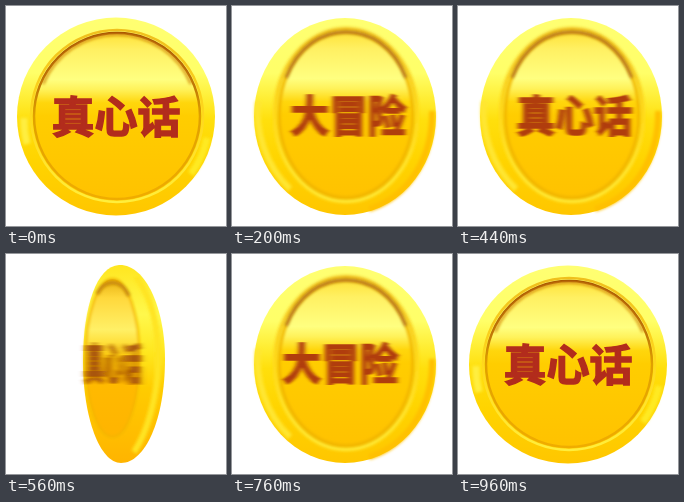
Recreate the animation shown at these times as an HTML page. Size 220 by 220 pixels, loop 3000 ms.

```html
<!DOCTYPE html>
<html lang="zh-CN">
<head>
<meta charset="utf-8">
<title>Coin flip</title>
<style>
  html, body { margin: 0; width: 100%; height: 100%; overflow: hidden; background: #fff; }
  svg { display: block; width: 100vw; height: 100vh; }
  text { font: 900 43px "Noto Sans CJK SC", "Noto Sans CJK", "Noto Sans", sans-serif; text-anchor: middle; stroke-width: 1.5; }
</style>
</head>
<body>
<svg viewBox="0 0 220 220">
  <defs>
    <linearGradient id="rim" x1="0" y1="0" x2="0" y2="1">
      <stop offset="0" stop-color="#ffff72"/>
      <stop offset=".28" stop-color="#ffff68"/>
      <stop offset=".42" stop-color="#ffec30"/>
      <stop offset=".52" stop-color="#ffdf0c"/>
      <stop offset=".72" stop-color="#ffd400"/>
      <stop offset="1" stop-color="#ffc600"/>
    </linearGradient>
    <linearGradient id="face" x1="0" y1="0" x2="0" y2="1">
      <stop offset="0" stop-color="#ffe238"/>
      <stop offset=".1" stop-color="#fff062"/>
      <stop offset=".28" stop-color="#ffff80"/>
      <stop offset=".34" stop-color="#fff25a"/>
      <stop offset=".42" stop-color="#ffd60c"/>
      <stop offset=".5" stop-color="#ffcd00"/>
      <stop offset="1" stop-color="#ffc200"/>
    </linearGradient>
    <linearGradient id="groove" x1="0" y1="0" x2="0" y2="1">
      <stop offset="0" stop-color="#9c4400"/>
      <stop offset=".25" stop-color="#b46808"/>
      <stop offset=".5" stop-color="#e0a000"/>
      <stop offset="1" stop-color="#f0ac00"/>
    </linearGradient>
    <linearGradient id="lip" x1="0" y1="0" x2="0" y2="1">
      <stop offset="0" stop-color="#f0c01c"/>
      <stop offset=".5" stop-color="#ffd81c"/>
      <stop offset="1" stop-color="#ffee3c"/>
    </linearGradient>
    <linearGradient id="side" x1="0" y1="0" x2="0" y2="1">
      <stop offset="0" stop-color="#ffe620"/>
      <stop offset=".25" stop-color="#fff84c"/>
      <stop offset=".45" stop-color="#ffe61c"/>
      <stop offset=".62" stop-color="#ffcc00"/>
      <stop offset="1" stop-color="#ffb400"/>
    </linearGradient>
    <linearGradient id="slim" x1="0" y1="0" x2="0" y2="1">
      <stop offset="0" stop-color="#e8b010"/>
      <stop offset=".12" stop-color="#ffd83c"/>
      <stop offset=".32" stop-color="#fff066"/>
      <stop offset=".5" stop-color="#ffcc08"/>
      <stop offset=".65" stop-color="#ffba00"/>
      <stop offset="1" stop-color="#ffb400"/>
    </linearGradient>
    <filter id="soft" x="-20%" y="-20%" width="140%" height="140%"><feGaussianBlur stdDeviation="1.6"/></filter>
    <filter id="smear" x="-20%" width="140%"><feGaussianBlur stdDeviation="2 0"/></filter>
    <filter id="streak" x="-40%" width="180%"><feGaussianBlur stdDeviation="3.4 0"/></filter>
  </defs>

  <g id="front">
    <circle cx="110" cy="110.5" r="99" fill="url(#rim)"/>
    <g fill="none" filter="url(#soft)">
      <path d="M18 112A94 94 0 0 0 21 138" stroke="#ffee40" stroke-width="7"/>
      <path d="M201 132A94 94 0 0 1 185 168" stroke="#ffea20" stroke-width="7"/>
    </g>
    <circle cx="111" cy="110" r="86" fill="none" stroke="url(#lip)" stroke-width="2.5"/>
    <circle cx="111" cy="110" r="83" fill="url(#face)" stroke="url(#groove)" stroke-width="2.5"/>
    <path d="M37 78A80 80 0 0 1 185 78" fill="none" stroke="#d69010" stroke-width="2.5" filter="url(#soft)"/>
  </g>

  <g id="wide">
    <ellipse cx="113" cy="110.5" rx="91" ry="98.5" fill="url(#rim)"/>
    <g fill="none" filter="url(#soft)">
      <path d="M200 105C201 150 178 190 137 203" stroke="#ffc000" stroke-width="6"/>
      <path d="M26 95C23 125 34 160 58 183" stroke="#ffe630" stroke-width="6"/>
      <ellipse cx="114" cy="109" rx="71" ry="86" stroke="url(#lip)" stroke-width="4"/>
    </g>
    <ellipse cx="114" cy="109" rx="67" ry="83" fill="url(#face)"/>
    <g fill="none" filter="url(#soft)">
      <ellipse cx="114" cy="109" rx="67" ry="83" stroke="#f0b400" stroke-width="3"/>
      <path d="M54 72C66 40 90 26 114 26S162 40 174 72" stroke="#b87008" stroke-width="3.5"/>
    </g>
  </g>

  <g id="narrow">
    <path d="M113 11C139 10 159 53 159 105C159 166 139 209 115 209C94 209 77 164 77 107C77 52 91 12 113 11Z" fill="url(#side)"/>
    <path d="M130 23C149 48 153 82 152 112S142 177 128 198" fill="none" stroke="#ffe420" stroke-width="6" filter="url(#soft)"/>
    <ellipse cx="106.5" cy="104" rx="27" ry="79" fill="url(#slim)"/>
    <g fill="none" filter="url(#soft)">
      <ellipse cx="106.5" cy="104" rx="27" ry="79" stroke="#f3b500" stroke-width="2"/>
      <path d="M91 40C99 25 115 24 123 42" stroke="#c98a08" stroke-width="4"/>
    </g>
  </g>

  <g id="edge">
    <rect x="96" y="11" width="30" height="198" rx="14" fill="url(#side)"/>
    <path d="M104 24V196M118 24V196" stroke="#f5b800" stroke-width="3" filter="url(#soft)"/>
  </g>

  <g id="blur"><g id="label"><text y="126.5"></text></g></g>
</svg>
<script>
  const STEP = 40, LAST = 24, LOOP = 3000, HALF_TURN = 6;
  const words = ["真心话", "大冒险"];
  // coin shape, label centre, label width, blur, ink
  const poses = [
    ["front", 110, 1, "", "#b22c1c"],
    ["wide", 108.5, .9, "smear", "#b03c10"],
    ["narrow", 107, .44, "streak", "#a85408"],
    ["edge", 111, 0, "", "none"],
    ["narrow", 119, .44, "streak", "#a85408"],
    ["wide", 116.5, .9, "smear", "#b03c10"]
  ];
  const get = id => document.getElementById(id);
  const coins = ["front", "wide", "narrow", "edge"].map(get);
  const label = get("label"), blur = get("blur"), text = label.firstChild;
  let shown = -1;

  function show(step) {
    const [coin, x, width, filter, ink] = poses[step % HALF_TURN];
    const side = Math.floor((step + HALF_TURN / 2) / HALF_TURN) % 2;
    for (const c of coins) c.style.display = c.id === coin ? "" : "none";
    blur.style.display = width ? "" : "none";
    blur.setAttribute("filter", filter ? `url(#${filter})` : "none");
    label.setAttribute("transform", `translate(${x} 0) scale(${width || 1} 1)`);
    text.textContent = words[side];
    text.setAttribute("fill", ink);
    text.setAttribute("stroke", ink);
  }

  function tick() {
    const step = Math.min(LAST, Math.floor(performance.now() % LOOP / STEP));
    if (step !== shown) show(shown = step);
    requestAnimationFrame(tick);
  }
  tick();
</script>
</body>
</html>
```
